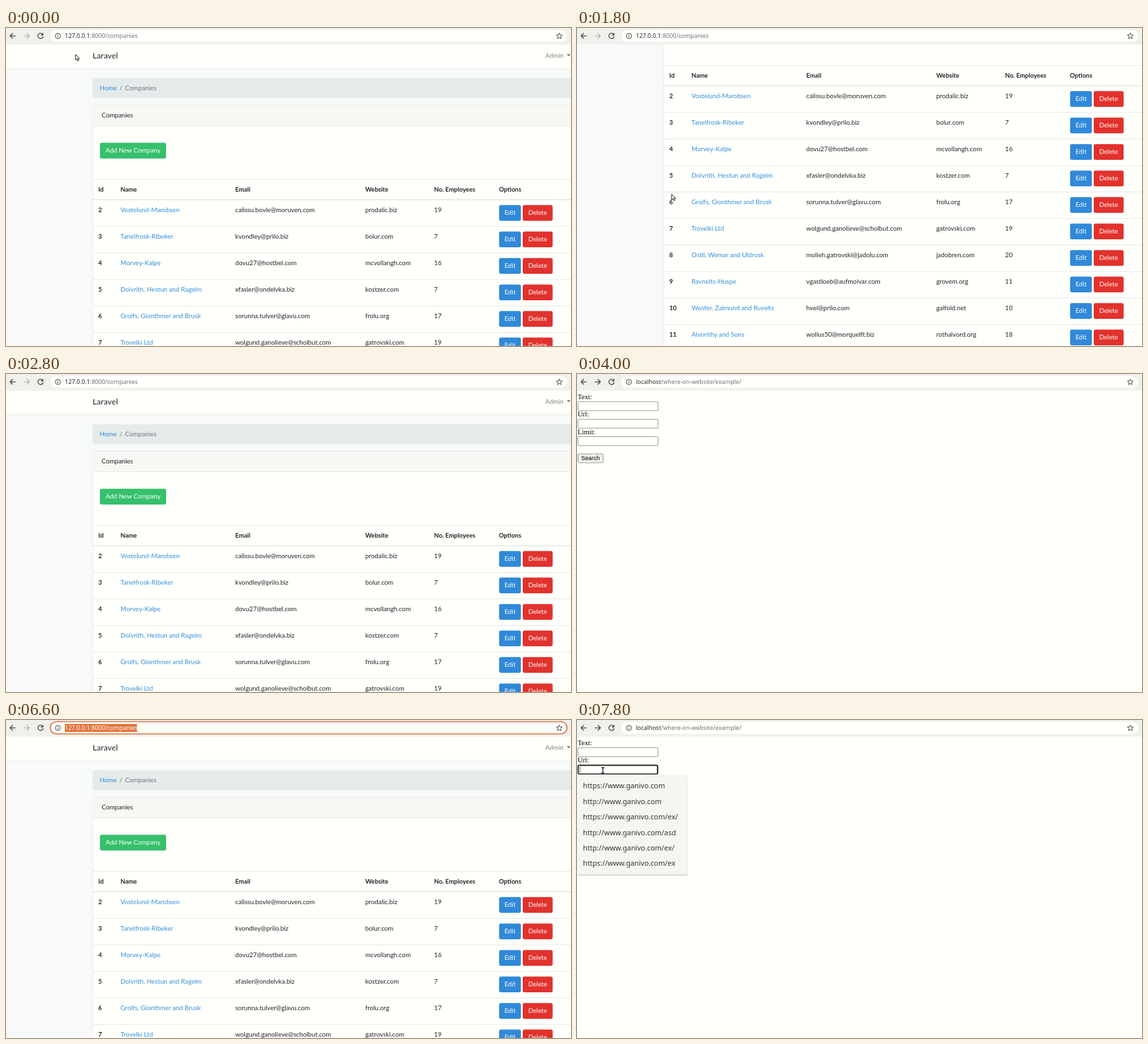
An HTML page that plays this animation: 854 px wide and 480 px high, repeating every 8 s.

```html
<!DOCTYPE html>
<html lang="en">
<head>
<meta charset="utf-8">
<title>Companies</title>
<style>
  html, body { margin: 0; width: 100%; height: 100%; overflow: hidden; background: #fffffb; }
  svg { display: block; width: 100%; height: 100%; }
  text { white-space: pre; }
  .ui { font-family: Lato, "Open Sans", sans-serif; font-size: 9.75px; fill: #212529; }
  .ui .th { font-weight: 700; font-size: 9.45px; }
  .ui .link { fill: #3490dc; }
  .ui .btn { fill: #fff; }
  .bar { font-family: "Noto Sans", sans-serif; font-size: 8.97px; }
  .form { font-family: "Liberation Serif", serif; font-size: 10.67px; fill: #000; }
  .hints { font-family: "Noto Sans", sans-serif; font-size: 10.8px; font-weight: 500; fill: #333; }
</style>
</head>
<body>
<svg id="stage" viewBox="0 0 854 480" preserveAspectRatio="none"></svg>
<script>
const LOOP = 8000, STEP = 200;
const C = {
  white: '#fffffb', body: '#f8fafa', bar: '#f0f1ed', head: '#f7f7f3', line: '#e3e6e5',
  crumb: '#e5ebea', green: '#36c06c', blue: '#3089d9', red: '#e2322d', orange: '#e4743c',
  dark: '#454749', muted: '#6c757d'
};

const companies = [
  [2, 'Vostelund-Marobsen', 'calissu.bovle@moruven.com', 'prodalic.biz', 19],
  [3, 'Tanelfrosk-Ribeker', 'kvondley@prilo.biz', 'bolur.com', 7],
  [4, 'Morvey-Kalpe', 'dovu27@hostbel.com', 'mcvollangh.com', 16],
  [5, 'Dolvrith, Hestun and Ragelm', 'xfasler@ondelvka.biz', 'kostzer.com', 7],
  [6, 'Grolfs, Glonthmer and Brusk', 'sorunna.tulver@glavu.com', 'frolu.org', 17],
  [7, 'Trovelki Ltd', 'wolgund.ganolieve@scholbut.com', 'gatrovski.com', 19],
  [8, 'Ostil, Wemar and Uldrosk', 'molieh.gatrovski@jadolu.com', 'jadobren.com', 20],
  [9, 'Ravnelts-Huspe', 'vgastloeb@aufmolvar.com', 'grovem.org', 11],
  [10, 'Wosfer, Zalmund and Ruvelts', 'hvel@prilo.com', 'galfold.net', 10],
  [11, 'Alvorithy and Sons', 'wollus50@morquelft.biz', 'rothalvord.org', 18]
];
const columns = [139.5, 173, 346.5, 543, 647, 745];
const hints = ['https://www.ganivo.com', 'http://www.ganivo.com', 'https://www.ganivo.com/ex/',
  'http://www.ganivo.com/asd', 'http://www.ganivo.com/ex/', 'https://www.ganivo.com/ex'];

const rect = (x, y, w, h, fill, extra = '') =>
  `<rect x="${x}" y="${y}" width="${w}" height="${h}" fill="${fill}" ${extra}/>`;
const text = (x, y, s, extra = '') => `<text x="${x}" y="${y}" ${extra}>${s}</text>`;
const path = (d, color, extra = '') =>
  `<path d="${d}" fill="none" stroke="${color}" ${extra}/>`;
const button = (x, y, w, label, fill) =>
  rect(x, y, w, 23.7, fill, 'rx="2.7"') +
  text(x + w / 2, y + 15.2, label, 'class="btn" text-anchor="middle"');

function companyRow([id, name, mail, site, staff], i) {
  const y = 259.5 + 40 * i, base = y + 18;
  const cells = [id, name, mail, site, staff];
  const look = ['class="th"', 'class="link"', '', '', ''];
  return cells.map((s, k) => text(columns[k], base, s, look[k])).join('') +
    button(745.3, y + 7.7, 33, 'Edit', C.blue) +
    button(781, y + 7.7, 45.3, 'Delete', C.red) +
    rect(131, y + 39.5, 723, .8, C.line);
}

function companyPage() {
  const titles = ['Id', 'Name', 'Email', 'Website', 'No. Employees', 'Options'];
  return rect(0, 25, 854, 900, C.body) +
    rect(0, 25, 854, 36, C.white) + rect(0, 60.5, 854, 1, '#eef0ee') +
    text(131, 46, 'Laravel', 'font-size="12.2"') +
    text(815, 45, 'Admin', 'fill="#848484"') +
    '<path d="M847.5 39.5h6l-3 3.2z" fill="#777"/>' +
    rect(131, 76, 740, 30, C.crumb, 'rx="3"') +
    text(141.5, 94, 'Home', `fill="${C.blue}"`) +
    text(171.5, 94, '/', `fill="${C.muted}"`) +
    text(180, 94, 'Companies', `fill="${C.muted}"`) +
    rect(131, 116.5, 740, 800, C.white, `stroke="${C.line}" stroke-width=".8" rx="3"`) +
    rect(131.4, 117, 740, 30.5, C.head) + rect(131, 147, 723, .8, C.line) +
    text(144.5, 134.7, 'Companies') +
    button(142, 173.2, 100, 'Add New Company', C.green) +
    rect(131, 228, 723, .8, C.line) + rect(131, 258.5, 723, 1.4, C.line) +
    titles.map((s, k) => text(columns[k], 246.5, s, 'class="th"')).join('') +
    companies.map(companyRow).join('');
}

function formPage() {
  const border = 'stroke="#858585" stroke-width=".8"';
  const field = (y, label) => text(1, y - 3.5, label) +
    rect(1.5, y + .5, 121, 13.5, C.white, border + ' rx="1"');
  return rect(0, 25, 854, 455, C.white) +
    field(41.3, 'Text:') + field(67.8, 'Url:') + field(94, 'Limit:') +
    rect(1.5, 120.7, 38, 13.3, '#efefec', border + ' rx="1.5"') +
    text(20.3, 130.2, 'Search', 'text-anchor="middle" style="font:8.9px \'Liberation Sans\',sans-serif"');
}

function toolbar() {
  return rect(0, 0, 854, 25, C.bar) +
    rect(67, 3, 781, 18, C.white, 'rx="9"') +
    `<rect id="ring" x="67" y="2.5" width="781" height="18.5" rx="9.2" fill="${C.white}" stroke="${C.orange}" stroke-width="1.7"/>` +
    path('M14.5 11.8H6.4M10.2 7.8L6.2 11.8L10.2 15.8', C.dark, 'stroke-width="1.3"') +
    '<path id="next" d="M27 11.8H35.2M31.4 7.8L35.4 11.8L31.4 15.8" fill="none" stroke-width="1.3"/>' +
    path('M55.3 9.2A4 4 0 1 0 56.2 12.6', C.dark, 'stroke-width="1.3"') +
    `<path d="M56.4 7v4.2h-4.2z" fill="${C.dark}"/>` +
    `<circle cx="78.5" cy="12" r="3.9" fill="none" stroke="${C.dark}"/>` +
    path('M78.5 11.4v2.6M78.5 9.5v1.1', C.dark) +
    path('M836.4 7.6l1.3 2.9 3.1.3-2.4 2.1.7 3.1-2.7-1.6-2.7 1.6.7-3.1-2.4-2.1 3.1-.3z', C.dark) +
    `<rect id="mark" x="89" y="6" width="109" height="12" fill="${C.orange}"/>` +
    '<text class="bar" x="89" y="15.2"><tspan id="host"></tspan><tspan id="rest"></tspan></text>';
}

function hintList() {
  return rect(1, 84, 166, 151, '#cfcfcc', 'rx="2" opacity=".8"') +
    rect(0, 82.5, 166.5, 150.5, '#f5f5f1', 'rx="2"') +
    hints.map((s, i) => text(9, 103.3 + 23.4 * i, s)).join('');
}

document.getElementById('stage').innerHTML =
  `<g id="table" class="ui">${companyPage()}</g>
   <g id="form" class="form">${formPage()}
     <g id="focus"><rect x="1.7" y="68.3" width="120" height="13.2" rx="1.5" fill="${C.white}" stroke="#181818" stroke-width="1.7"/>
       ${path('M4.5 70.5v9', '#333', 'stroke-width=".7"')}</g>
   </g>
   <g id="hints" class="hints">${hintList()}</g>
   ${toolbar()}
   <path id="arrow" d="M0 0V8.2L2 6.5L3.5 9.7L5 9L3.6 6H6.2Z" fill="${C.white}" stroke="#222" stroke-width="1"/>
   <path id="beam" d="M-2.2 -4H2.2M0 -4V4M-2.2 4H2.2" fill="none" stroke="#222" stroke-width="1.3"/>`;

const el = {};
document.querySelectorAll('#stage [id]').forEach(n => el[n.id] = n);

// Tracks of [time, ...values], linear between keys
const pointer = [
  [0, 105, 40], [200, 72, 150], [400, 240, 468], [600, 700, 400], [800, 848, 150],
  [1000, 480, 9], [1200, 180, 120], [1400, 143, 251], [2000, 143, 251],
  [2400, 110, 17], [2600, 100, -20], [4400, 222, -20], [4600, 226, 4],
  [4800, 229, 13], [5000, 229, 13], [5400, 140, 313], [5800, 50, 100],
  [6000, 20, 1], [6200, 20, -20], [7000, 70, -20], [7200, 60, 16],
  [7400, 44, 48], [7600, 39, 76], [8000, 39, 76]
];
const scrolling = [[0, 0], [1400, 0], [1800, 172], [2000, 172], [2400, 0], [8000, 0]];

function sample(track, t) {
  const i = Math.max(1, track.findIndex(k => k[0] > t));
  const a = track[i - 1], b = track[i], p = (t - a[0]) / (b[0] - a[0]);
  return a.slice(1).map((v, k) => v + (b[k + 1] - v) * p);
}
const within = (t, a, b) => t >= a && t < b;
const show = (node, on) => node.setAttribute('display', on ? 'inline' : 'none');

function render(time) {
  const t = Math.floor(time / STEP) * STEP;
  const onForm = within(t, 3000, 4400) || t >= 6800;
  const selected = within(t, 5000, 6800);
  const [x, y] = sample(pointer, t);
  const beam = within(t, 4600, 5200) || t >= 7600;

  show(el.table, !onForm);
  show(el.form, onForm);
  show(el.focus, t >= 7600);
  show(el.hints, t >= 7800);
  show(el.ring, selected);
  show(el.mark, selected);
  el.table.setAttribute('transform', `translate(0 ${-sample(scrolling, t)[0]})`);
  el.next.setAttribute('stroke', onForm ? C.dark : '#b4b6b6');
  el.host.textContent = onForm ? 'localhost' : '127.0.0.1';
  el.rest.textContent = onForm ? '/where-on-website/example/' : ':8000/companies';
  el.host.setAttribute('fill', selected ? C.white : '#26282a');
  el.rest.setAttribute('fill', selected ? C.white : C.muted);

  show(el.arrow, !beam);
  show(el.beam, beam);
  (beam ? el.beam : el.arrow).setAttribute('transform', `translate(${x} ${y})`);
}

const start = performance.now();
function tick() {
  render((performance.now() - start) % LOOP);
  requestAnimationFrame(tick);
}
tick();
</script>
</body>
</html>
```
